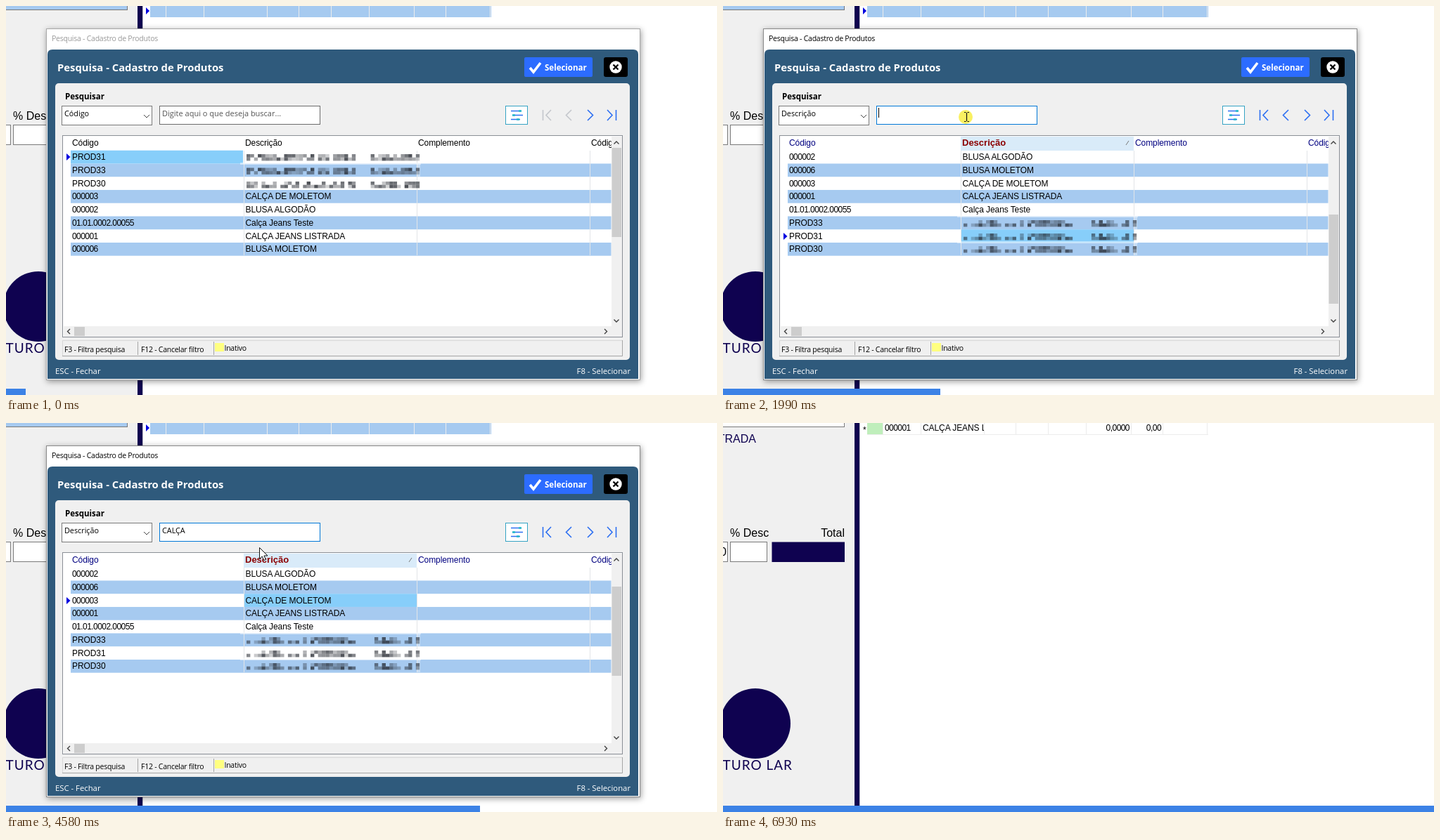
Recreate the animation shown at these times as an HTML page. Size 1011 by 554 pixels, loop 7.13 s.

```html
<!DOCTYPE html>
<html lang="pt-BR">
<head>
<meta charset="utf-8">
<title>Pesquisa de produtos</title>
<style>
html, body { margin: 0; width: 100%; height: 100%; overflow: hidden; background: #fff; }
svg { display: block; width: 1011px; height: 554px; }
text { white-space: pre; }
.ui { font: 10.8px "Open Sans", "Noto Sans", sans-serif; }
.hint { font: 11px "Open Sans", "Noto Sans", sans-serif; }
.tight { font: 10.5px "Open Sans", "Noto Sans", sans-serif; letter-spacing: -.25px; }
.foot { font: 11.3px "Open Sans", "Noto Sans", sans-serif; }
.bold { font: bold 11.5px "Open Sans", "Noto Sans", sans-serif; }
.head { font: bold 14.8px "Open Sans", "Noto Sans", sans-serif; }
.cell { font: 12px "Liberation Sans", Arial, sans-serif; letter-spacing: -.08px; }
.num { font: 12px "Liberation Sans", Arial, sans-serif; letter-spacing: -.55px; }
.sort { font: bold 13px "Liberation Sans", Arial, sans-serif; }
.big { font: 16px "Liberation Sans", Arial, sans-serif; }
.brand { font: 19px Lato, sans-serif; letter-spacing: 1px; }
</style>
</head>
<body>
<svg id="stage" viewBox="0 0 1011 554"></svg>
<script>
const LOOP = 7130;
const STARTS = [0, 200, 400, 600, 790, 990, 1190, 1390, 1590, 1790, 1990, 2190,
  2390, 2580, 2780, 2970, 3200, 3390, 3590, 3790, 3990, 4190, 4380, 4580,
  4770, 4960, 5160, 5360, 5550, 5750, 5950, 6150, 6350, 6540, 6740, 6930];

// Steps at which the interface changes
const ACTIVE = 1, HOVER = 5, PICK = 6, SORTED = 8, FIELD = 9, TIP = 13,
  TYPE = 16, LEAVE = 25, CLICK = 27, CLOSE = 30;

// From step, pointer kind, x, y, click glow
const POINTER = [
  [0], [2, 'arrow', 470, 262], [3, 'arrow', 428, 236], [4, 'arrow', 394, 210],
  [5, 'arrow', 377, 194], [6, 'arrow', 377, 194, 1], [7, 'tick', 380, 200],
  [8, 'arrow', 374, 190], [9, 'beam', 352, 161], [10, 'beam', 346, 158, 1],
  [11, 'beam', 346, 158], [21, 'beam', 348, 160], [22, 'beam', 354, 164],
  [23, 'arrow', 360, 177], [24, 'arrow', 362, 190], [25, 'arrow', 363, 222],
  [26, 'arrow', 365, 253], [27, 'arrow', 365, 267, 1], [29, 'arrow', 365, 267], [32]
];

const CARET = [1, 2, 6, 7, 10, 11, 17, 19, 20];
const NAVY = '#0f0250', STRIPE = '#a6caf0', PICKED = '#87cefa', BLUE = '#2c6ff2';
const PITCH = 18.75;
const HIDDEN = null;
const BY_CODE = [['PROD31', HIDDEN], ['PROD33', HIDDEN], ['PROD30', HIDDEN],
  ['000003', 'CALÇA DE MOLETOM'], ['000002', 'BLUSA ALGODÃO'],
  ['01.01.0002.00055', 'Calça Jeans Teste'], ['000001', 'CALÇA JEANS LISTRADA'],
  ['000006', 'BLUSA MOLETOM']];
const BY_NAME = [4, 7, 3, 6, 5, 1, 0, 2].map(i => BY_CODE[i]);

const rect = (x, y, w, h, fill, more = '') =>
  `<rect x="${x}" y="${y}" width="${w}" height="${h}" fill="${fill}" ${more}/>`;
const frame = (x, y, w, h, fill, stroke, more = '') =>
  rect(x + .5, y + .5, w - 1, h - 1, fill, `stroke="${stroke}" ${more}`);
const text = (cls, x, y, s, fill = '#000', more = '') =>
  `<text class="${cls}" x="${x}" y="${y}" fill="${fill}" ${more}>${s}</text>`;
const line = (d, stroke, width = 1) =>
  `<path d="${d}" fill="none" stroke="${stroke}" stroke-width="${width}"/>`;
const shape = (d, fill, more = '') => `<path d="${d}" fill="${fill}" ${more}/>`;
const END = 'text-anchor="end"';
const rowTop = i => 206 + Math.round(PITCH * i);
const rowBand = (i, x, w, fill) => rect(x, 205.7 + PITCH * i, w, PITCH, fill);

function random(seed) {
  return () => (seed = (seed * 16807) % 2147483647) / 2147483647;
}

// Censored text: two uneven lines of grey blocks, the lower one denser
function mosaic(y, seed) {
  const rnd = random(seed * 7919), step = 5.35;
  let out = '';
  for (let x = 342; x < 585; x += step) {
    const gap = (x > 492 && x < 516) || rnd() < .1;
    for (let k = 0; k < 2; k++) {
      const dark = .2 + rnd() * .6, filled = rnd() < (k ? .88 : .68);
      if (filled && !gap)
        out += rect(x.toFixed(1), y + k * 4.7, step, 4.7, '#20242c', `opacity="${dark.toFixed(2)}"`);
    }
  }
  return out;
}

function background(done) {
  let out = rect(0, 0, 1011, 554, '#fff') + rect(0, 0, 187, 554, '#f0f0f0')
    + rect(187, 0, 7, 554, NAVY) + rect(194, 0, 1, 554, '#c4c4cc')
    + frame(-5, -20, 178, 26, done ? '#fff' : STRIPE, '#7a7a7a')
    + frame(-30, 169, 37, 29, '#fff', '#7a7a7a') + frame(10, 169, 53, 29, '#fff', '#7a7a7a')
    + text('big', 10, 162, '% Desc') + text('big', 173, 162, 'Total', '#000', END)
    + rect(69.5, 169.5, 103.5, 28.5, NAVY)
    + `<circle cx="46" cy="428" r="50" fill="${NAVY}"/>`
    + text('brand', 99, 494, 'TURO LAR', NAVY, END);
  if (done) {
    out += text('big', 47, 28, 'LISTRADA', NAVY, END) + text('big', 5, 189, '0,00', '#000', END)
      + rect(205, 0, 23, 16, '#bfeebb') + text('cell', 199, 14, '*')
      + text('num', 230, 11, '000001') + text('cell', 284, 11, 'CALÇA JEANS L', '#000', 'clip-path="url(#name)"')
      + text('num', 578, 11, '0,0000', '#000', END) + text('num', 623, 11, '0,00', '#000', END)
      + line('M205 16.5H690', '#ececec');
  } else {
    out += rect(205, 0, 485, 16, STRIPE) + shape('M199 2l5 5-5 5z', '#0000e0');
  }
  const cols = [228, 282, 372, 417, 463, 517, 581, 626, 689];
  return out + line(cols.map(x => `M${x - .5} 0V16`).join(''), '#ececec');
}

function toolbar(n) {
  const picked = n >= PICK, focused = n >= FIELD && n < CLICK;
  const typed = 'CALÇA'.slice(0, Math.max(0, n - TYPE + 1));
  const back = picked ? BLUE : '#c4c7cc';
  const edge = focused ? '#0078d7' : n >= CLICK ? '#587088' : '#6c6c6c';
  let out = text('bold', 84, 133, 'Pesquisar')
    + frame(79, 142, 129, 28, '#fff', '#7a7a7a')
    + text('ui', 83, 157, picked ? 'Descrição' : 'Código')
    + line('M196 155l4 4 4-4', '#444')
    + frame(218, 142, 229, 27, '#fff', edge)
    + (picked ? text('ui', 222, 157, typed) : text('hint', 222, 157, 'Digite aqui o que deseja buscar...', '#555'));
  if (CARET.includes(n)) out += rect(221 + typed.length * 6.7, 145, 1, 14, '#000');
  return out + frame(710, 142, 32, 27, '#fff', '#35a3c4')
    + line('M718 149.5H733M720 155.5H735M718 161.5H731', BLUE, 1.3)
    + line('M729 149.5H733M720 155.5H724M726 161.5H730', '#22b8c8', 2.4)
    + line('M763.5 148V163M775 148l-7 7.5 7 7.5M804 148l-7.5 7.5 7.5 7.5', back, 1.6)
    + line('M827 148l7.5 7.5-7.5 7.5M855 148l7 7.5-7 7.5M867.5 148V163', BLUE, 1.6);
}

function grid(n) {
  const sorted = n >= SORTED, rows = sorted ? BY_NAME : BY_CODE;
  const current = !sorted ? 0 : n < TYPE ? 6 : n < CLICK ? 2 : 3;
  const thumb = n < PICK ? 202 : n < TYPE ? 297 : n < CLICK ? 233 : 250;
  const hover = n >= HOVER && n < LEAVE, ink = sorted ? '#000080' : '#000';
  let out = frame(80, 184, 797, 288, '#fff', '#8a8f96');
  if (hover) out += rect(338, 186, 246, 20, '#d9ebf9');
  rows.forEach((row, i) => {
    if (i % 2) out += rowBand(i, 92, 768.5, STRIPE);
  });
  out += line('M338.5 206V355M584.5 206V355M830.5 206V355', '#e2e5e8');

  const top = rowTop(current), left = sorted ? 339 : 92;
  out += rowBand(current, left, 245, PICKED);
  if (n === 7 || n >= CLICK)
    out += frame(left, top + 1, 244, 17, 'none', '#173b58');
  out += shape(`M86 ${top + 4}l5.5 5-5.5 5z`, '#0000e0');

  rows.forEach(([code, name], i) => {
    const y = rowTop(i);
    out += text(/^P/.test(code) ? 'cell' : 'num', 94, y + 13, code);
    if (name) return out += text('cell', 340.5, y + 13, name);
    if (i % 2) out += rect(333, y - 2, 257, 3, '#fff', 'opacity=".45"') + rect(585, y, 4, 18, '#fff', 'opacity=".35"');
    out += mosaic(y + (sorted ? 5 : 5 + i / 2), sorted ? 31 : 12 + (i === 2));
  });

  const press = n === 7 ? 1 : 0;
  out += text('cell', 94, 199, 'Código', ink)
    + text(sorted ? 'sort' : 'cell', 340 + press, 199 + press, 'Descrição', sorted ? '#8b0000' : '#000')
    + text('cell', 586, 199, 'Complemento', ink)
    + text('cell', 832, 199, 'Código', ink, 'clip-path="url(#last)"');
  if (sorted) out += line('M573 198l4-6', '#777');

  return out + rect(861, 186, 15, 285, '#f0f0f0') + rect(82, 456, 794, 15, '#f0f0f0')
    + rect(861.5, thumb, 13.5, 127, '#cdcdcd') + rect(97, 457, 15, 13, '#cdcdcd')
    + line('M864.5 196.5l3.5-3.5 3.5 3.5M864.5 446.5l3.5 3.5 3.5-3.5M91 460l-3.5 3.5 3.5 3.5M851 460l3.5 3.5-3.5 3.5', '#404040', 1.4);
}

function dialog(n) {
  const on = n >= ACTIVE;
  return `<g filter="url(#shadow)">${rect(57, 32, 845, 501, '#fff')}</g>`
    + frame(57, 32, 845, 501, '#fff', on ? '#8a8a8a' : '#a8a8a8')
    + text('tight', 65, 50, 'Pesquisa - Cadastro de Produtos', on ? '#000' : '#999')
    + shape('M59 531V69q0-7 7-7H892q7 0 7 7V531z', '#2f5a7c')
    + text('head', 73, 93, 'Pesquisa - Cadastro de Produtos', '#fff')
    + rect(737, 73, 97, 28, '#2c6cff', 'rx="2"')
    + line('M745 88l5 6 10-13', '#fff', 3.6) + text('bold', 766, 92, 'Selecionar', '#fff')
    + rect(850, 73, 34, 28, '#000', 'rx="3"') + '<circle cx="867" cy="87" r="8.7" fill="#fff"/>'
    + line('M863.5 83.5l7 7m0-7l-7 7', '#000', 2.3)
    + rect(70, 110, 817, 394, '#f0f0f0', 'rx="5"')
    + toolbar(n) + grid(n)
    + frame(80, 476, 797, 23, '#f0f0f0', '#d8d8d8')
    + line('M80 498.5H876.5V476M187.5 478V497M295.5 478V497', '#a5a5a5')
    + text('tight', 83, 493, 'F3 - Filtra pesquisa') + text('tight', 192, 493, 'F12 - Cancelar filtro')
    + rect(297, 480, 13, 12, '#ffff80') + text('tight', 310.5, 491, 'Inativo')
    + text('foot', 70, 524, 'ESC - Fechar', '#fff') + text('foot', 888, 524, 'F8 - Selecionar', '#fff', END);
}

function tip() {
  return `<g filter="url(#shadow)">${shape('M-20 16.5H357.5V118.5H343.5V135L327 118.5H-20z', '#fff', 'stroke="#666"')}</g>`
    + text('tight', 94, 53, 'Informe o conteúdo do campo ordenado.', '#000', END)
    + text('tight', 344, 67, 'Escolha o critério de pesquisa. Ele corresponde ao campo atualmente ordenado na lista', '#000', END)
    + text('tight', 323, 107, 'Pressione F3 para filtrar todos os registros que possuem a palavra digitada.', '#000', END);
}

function pointer(n) {
  const [, kind, x, y, glow] = POINTER.filter(p => p[0] <= n).pop();
  if (!kind) return '';
  const halo = glow ? `<circle cx="${x - 1}" cy="${y}" r="10" fill="#f7ec3a" opacity=".8"/>` : '';
  const art = {
    arrow: shape('M.5 .5V16.5L4.2 13L6.8 18.6L9.4 17.5L6.9 12H12z', '#fff', 'stroke="#111"'),
    beam: line('M-3 -6.5H-.5M1.5 -6.5H4M-3 6.5H-.5M1.5 6.5H4M.5 -6V6', '#111', 1.2),
    tick: line('M-1 5L2 2M-2 3H2', '#333')
  }[kind];
  return `${halo}<g transform="translate(${x} ${y})">${art}</g>`;
}

const DEFS = `<defs>
  <filter id="shadow" x="-5%" y="-10%" width="110%" height="120%">
    <feDropShadow dx="1" dy="2" stdDeviation="4.5" flood-opacity=".4"/></filter>
  <clipPath id="name"><rect x="282" y="0" width="90" height="16"/></clipPath>
  <clipPath id="last"><rect x="830" y="186" width="31" height="20"/></clipPath>
</defs>`;

function scene(n) {
  return DEFS + background(n >= CLOSE)
    + (n < CLOSE ? dialog(n) : '')
    + (n >= TIP && n < TYPE ? tip() : '')
    + pointer(n)
    + rect(0, 545, Math.round(1011 * (n + 1) / STARTS.length), 9, '#3c82e6');
}

const stage = document.getElementById('stage');
const origin = performance.now();
let shown = -1;

function tick() {
  const t = (performance.now() - origin) % LOOP;
  const n = STARTS.filter(s => s <= t).length - 1;
  if (n !== shown) stage.innerHTML = scene(shown = n);
  requestAnimationFrame(tick);
}
tick();
</script>
</body>
</html>
```
